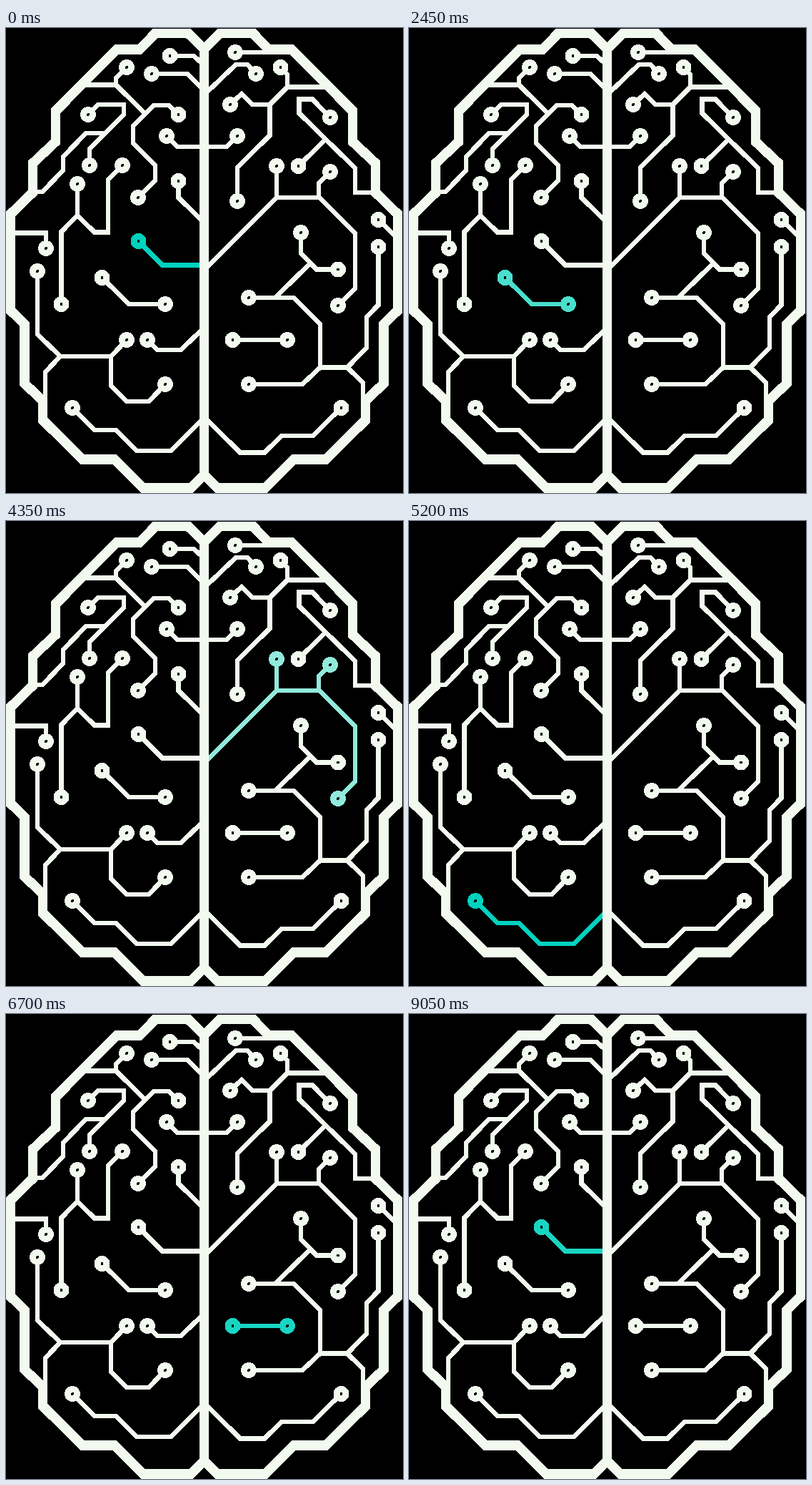
Recreate the animation shown at these times as an HTML page. Size 556x650 px, loop 9100 ms.

```html
<!DOCTYPE html>
<html lang="en">
<head>
<meta charset="utf-8">
<title>Circuit brain</title>
<style>
html, body { margin: 0; width: 100%; height: 100%; overflow: hidden; background: #000; }
svg { display: block; width: 556px; height: 650px; shape-rendering: crispEdges; }
#circuits { stroke: #f2faf0; stroke-width: 6.6; fill: none; }
#circuits circle { fill: #000; stroke-width: 9; }
#shell { stroke: #f2faf0; stroke-width: 13.6; fill: none; }
</style>
</head>
<body>
<svg viewBox="0 0 556 650">
  <!-- In each circuit, every uppercase M marks a ring node. -->
  <g id="circuits">
    <!-- pulsing, in order -->
    <g class="pulse"><path d="M185.5 298L219 331.5H275"/></g>
    <g class="pulse"><path d="M469.5 531L430 570H386L362 593.5H328L280 546"/></g>
    <g class="pulse"><path d="M134.5 349L172 386H223M223 386"/></g>
    <g class="pulse"><path d="M379 193V237M454 201L438 217V237M465 388L489 364V287L439 237H379L280 336"/></g>
    <g class="pulse"><path d="M93 531L124 562H154L183 591H231L275 547"/></g>
    <g class="pulse"><path d="M317.5 436H394M394 436"/></g>
    <g class="pulse"><path d="M204 64H254L275 85"/></g>
    <!-- left -->
    <g><path d="M229.5 39H263L275 50"/></g>
    <g><path d="M169 55L154 70V79.5H108m46 0L193 118"/></g>
    <g><path d="M241.5 121L228 108H207L178 137V161L209 192V213L185 237M185 237"/></g>
    <g><path d="M115 121L129 107H165V121L117 169V192M117 192m23 -45H112L80 180V199L51 229H40"/></g>
    <g><path d="M225 151L240 166H309L324 151M324 151"/></g>
    <g><path d="M241.5 214V237L275 270"/></g>
    <g><path d="M163 192L143 212V285.5H124L100 262M100 218V262L77.5 285V386M77.5 386"/></g>
    <g><path d="M56 308V286.5H10"/></g>
    <g><path d="M44 340V428L76 459H147M169 436L147 459V500L169 522H200L223 498M223 498m-147 -39L55 481V520"/></g>
    <g><path d="M198 436L212 450H245L275 421"/></g>
    <!-- right -->
    <g><path d="M321 34H368"/></g>
    <g><path d="M350 64L338 51H322L280 91"/></g>
    <g><path d="M384.5 55L394 65V82.5H448m-54 0L369.5 107V150L324 195V242M324 242M314 107L330 92L345 107H370"/></g>
    <g><path d="M454 125L429 99.5H410.5V119L489 196V230H515M409.5 193L446 157"/></g>
    <g><path d="M521.5 268L545 291"/></g>
    <g><path d="M521.5 306V387L505 404V447L478 474.5L500 496V520M340 498H415L440 474.5H478M340 377H403L440 414V474m-63 -97L428 327M413 286V315L435 337.5H465M465 337.5"/></g>
  </g>
  <g id="shell">
    <path id="half" d="M277.5 29L255 7.5H209L187 30H155L69.5 116V159L37.5 189V230L6.5 260V395L26 414V497L51.5 521V548L107 603H152L192 643H259L277.5 625"/>
    <use href="#half" transform="matrix(-1 0 0 1 555 0)"/>
    <path d="M277.5 25V630"/>
  </g>
</svg>
<script>
const REST = [242, 250, 240], GLOW = [0, 210, 190];
const SLOT = 1300, STEP = 50;

for (const path of document.querySelectorAll('#circuits path')) {
  for (const [, x, y] of path.getAttribute('d').matchAll(/M([\d.]+) ([\d.]+)/g)) {
    const ring = document.createElementNS(path.namespaceURI, 'circle');
    ring.setAttribute('cx', x);
    ring.setAttribute('cy', y);
    ring.setAttribute('r', 6.5);
    path.parentNode.append(ring);
  }
}

const pulses = [...document.querySelectorAll('.pulse')];
const clamp = v => Math.min(1, Math.max(0, v));
const blend = k => `rgb(${REST.map((c, i) => Math.round(c + (GLOW[i] - c) * k))})`;

function draw(now) {
  const t = now % (SLOT * pulses.length);
  const current = Math.floor(t / SLOT);
  const next = (current + 1) % pulses.length;
  const step = Math.floor(t % SLOT / STEP);
  // Hold, fade out in ten steps, pause, then fade the next circuit in.
  pulses.forEach((pulse, i) => {
    const level = i === current ? (13 - step) / 10 : i === next ? (step - 16) / 10 : 0;
    pulse.style.stroke = blend(clamp(level));
  });
}

const start = performance.now();
function frame() {
  draw(performance.now() - start);
  requestAnimationFrame(frame);
}
frame();
</script>
</body>
</html>
```
